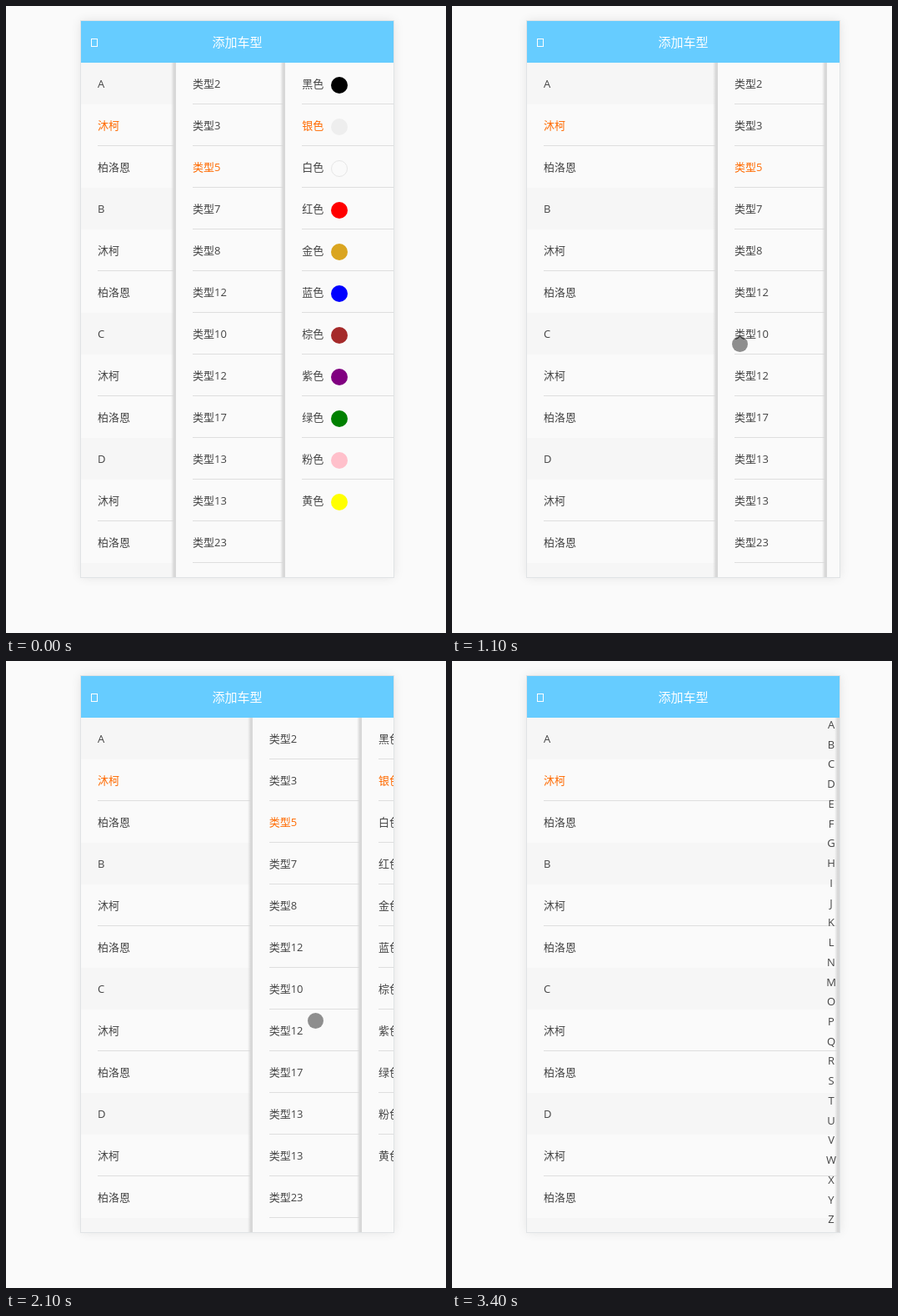
An HTML page for the animation above (4300 ms loop, 528x752 px).

```html
<!DOCTYPE html>
<html lang="zh-CN">
<head>
<meta charset="utf-8">
<style>
* { box-sizing: border-box; }
html, body { margin: 0; width: 100%; height: 100%; overflow: hidden; background: #fafafa; }
body { position: relative; font: 13px "Open Sans", "Noto Sans CJK SC", "Noto Sans CJK", sans-serif; color: #444; white-space: nowrap; }
#phone { position: absolute; left: 90px; top: 18px; width: 375px; height: 667px; box-shadow: 0 0 0 1px #e0e3e5, 0 0 12px rgba(0, 0, 0, .1); }
header { height: 50px; background: #6cf; color: #fff; font-size: 15px; font-weight: 500; line-height: 51px; text-align: center; }
header i { position: absolute; left: 12px; top: 21px; width: 8px; height: 10px; border: 1px solid #fff; }
main { position: relative; height: 617px; overflow: hidden; }
.col { position: absolute; top: 0; left: 0; width: 375px; height: 617px; background: #fafafa; }
.panel::before { content: ""; position: absolute; left: -6px; width: 6px; height: 100%; background: linear-gradient(to right, rgba(214, 214, 214, 0), #d8d8d8 60%); }
.row { position: relative; height: 50px; line-height: 50px; margin-left: 20px; border-bottom: 1px solid #dedede; }
.head { margin-left: 0; padding-left: 20px; background: #f6f6f6; }
.head, .last { border-color: transparent; }
.on { color: #ff6a00; }
.dot { position: absolute; left: 35px; top: 17px; width: 20px; height: 20px; border-radius: 50%; }
#index span { position: absolute; left: 355px; width: 20px; text-align: center; line-height: 16px; }
#touch { position: absolute; width: 19px; height: 19px; border-radius: 50%; background: rgba(0, 0, 0, .43); }
</style>
</head>
<body>
<div id="phone">
  <header><i></i>添加车型</header>
  <main>
    <div class="col" id="makes"></div>
    <div class="col panel" id="types"></div>
    <div class="col panel" id="colors"></div>
    <div id="index"></div>
  </main>
</div>
<div id="touch"></div>
<script>
const $ = id => document.getElementById(id);
const row = (text, cls = '') => `<div class="row ${cls}">${text}</div>`;

$('makes').innerHTML = [...'ABCDE'].map((c, i) =>
  row(c, 'head') + row('沐柯', i ? '' : 'on') + row('柏洛恩', 'last')).join('');

$('types').innerHTML = '2 3 5 7 8 12 10 12 17 13 13 23'.split(' ')
  .map((n, i) => row('类型' + n, i === 2 ? 'on' : '')).join('');

const paints = ['black', '#eee', '#fafafa;border:1px solid #e6e6e6', 'red', 'goldenrod', 'blue',
  'brown', 'purple', 'green', 'pink', 'yellow'];
$('colors').innerHTML = [...'黑银白红金蓝棕紫绿粉黄'].map((c, i) =>
  row(`${c}色<b class="dot" style="background:${paints[i]}"></b>`,
    i === 1 ? 'on' : i === 10 ? 'last' : '')).join('');

$('index').innerHTML = [...'ABCDEFGHIJKLNMOPQRSTUVWXYZ'].map((c, i) =>
  `<span style="top:${i * 617 / 26}px">${c}</span>`).join('');

const LOOP = 4300, STEP = 100;

// Progress from 0 to 1 between two times, slowing down when pow > 1
function ease(t, from, to, pow = 1.7) {
  const u = Math.min(1, Math.max(0, (t - from) / (to - from)));
  return 1 - (1 - u) ** pow;
}

// Two drags to the right: the first snaps back, the second closes the panels
function panelX(t) {
  const pull = 115 * ease(t, 700, 1100, 1) * (1 - ease(t, 1300, 1600, 1.67));
  return 114 + pull + 184 * ease(t, 1900, 2500) + 77 * ease(t, 2500, 2800);
}

function touchAt(t) {
  let x = 378, y = 183;
  const move = (from, to, dx, dy, pow) => {
    const k = ease(t, from, to, pow);
    x += dx * k;
    y += dy * k;
  };
  move(100, 600, -157, 209, 1);
  move(600, 1100, 115, 4, 1.4);
  move(1400, 1800, -56.5, 28.5, 1);
  move(1900, 2500, 166.5, -4.5);
  move(2900, 3000, -9, -15);
  move(3100, 3300, 72, 0, 1);
  return [x, y];
}

function draw(now) {
  const t = Math.floor(now % LOOP / STEP) * STEP;
  const left = panelX(t), [x, y] = touchAt(t), touch = $('touch');
  $('types').style.left = left + 'px';
  $('colors').style.left = left + 131.25 + 'px';
  $('index').hidden = t < 3200;
  touch.hidden = t < 100 || t >= 3400;
  touch.style.left = x + 'px';
  touch.style.top = y + 'px';
}

const start = performance.now();
function tick() {
  draw(performance.now() - start);
  requestAnimationFrame(tick);
}
tick();
</script>
</body>
</html>
```
